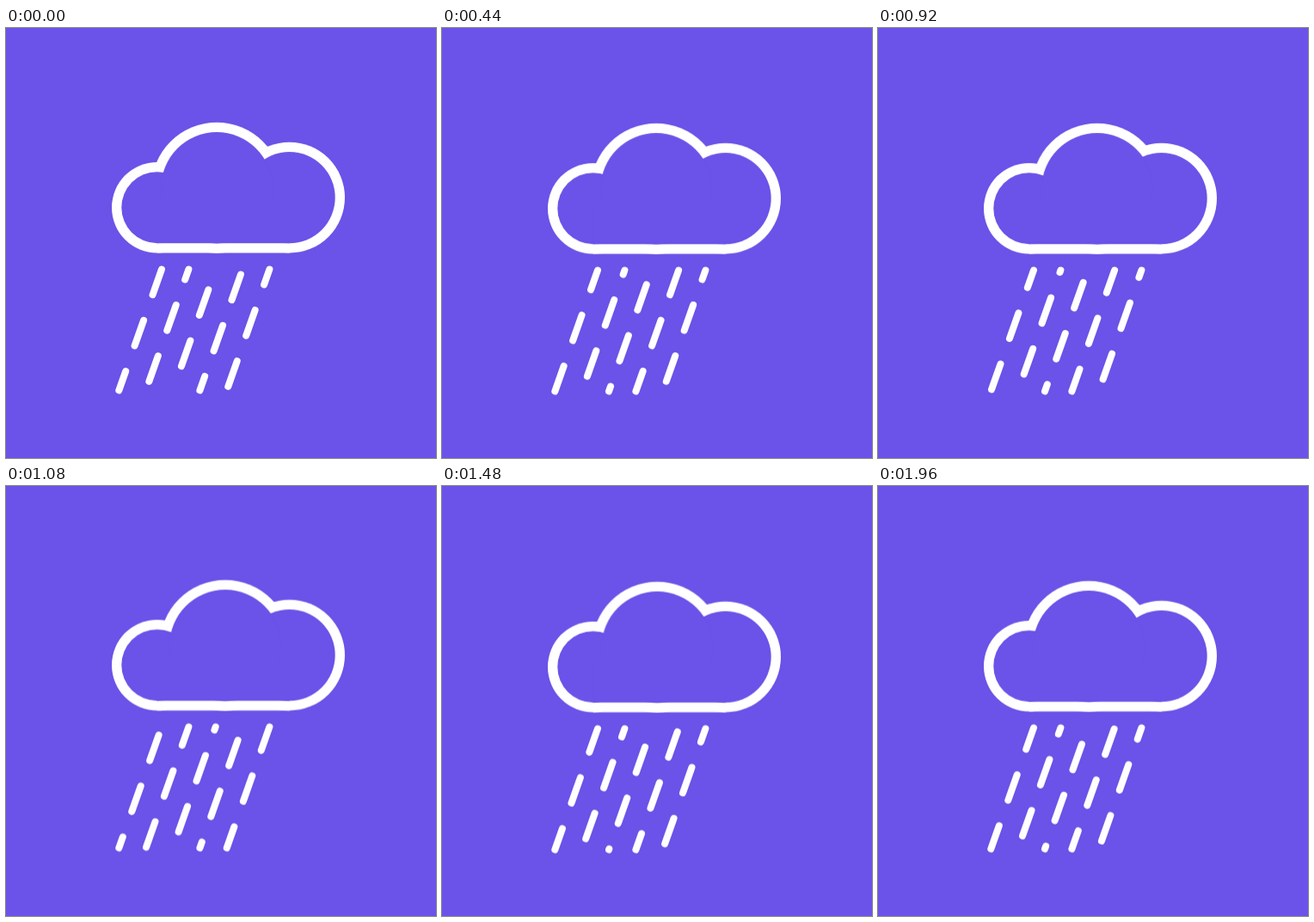
These frames come from a looping animation (500 by 500 pixels, 2 s). An HTML page:

```html
<!DOCTYPE html>
<html lang="en">
<head>
<meta charset="utf-8">
<title>Rain cloud</title>
<style>
  :root { --sky: #6b52e8; --sine: cubic-bezier(.37, 0, .63, 1); }
  html, body { margin: 0; width: 100%; height: 100%; overflow: hidden; background: var(--sky); }
  svg { display: block; width: 100%; height: 100%; }

  .bob { animation: bob .5s var(--sine) -.32s infinite alternate; }
  .puff { animation: drift 1s var(--sine) infinite alternate; }
  .rim { fill: #fff; }
  .core { fill: var(--sky); }

  .rain line {
    stroke: #fff;
    stroke-width: 8;
    stroke-linecap: round;
    stroke-dasharray: 31.4;
    animation: fall .5s linear calc(var(--i) * -.35s) infinite;
  }

  @keyframes bob { from { transform: translateY(1.8px); } to { transform: translateY(-1.8px); } }
  @keyframes drift { from { transform: translateX(-5px); } to { transform: translateX(5px); } }
  @keyframes fall { from { stroke-dashoffset: 0; } to { stroke-dashoffset: -62.8px; } }
</style>
</head>
<body>
<svg viewBox="0 0 500 500">
  <g class="bob">
    <g class="rim">
      <circle cx="175.8" cy="209.7" r="52.8"/>
      <circle cx="329.6" cy="198.1" r="64.4"/>
      <circle class="puff" cx="250" cy="186.8" r="76"/>
      <rect x="175.8" y="205" width="153.8" height="57.5"/>
    </g>
    <g class="core">
      <circle cx="175.8" cy="209.7" r="41.5"/>
      <circle cx="329.6" cy="198.1" r="53.1"/>
      <circle class="puff" cx="250" cy="186.8" r="64.7"/>
      <rect x="175.8" y="205" width="153.8" height="46.2"/>
    </g>
    <g class="rain">
      <line style="--i:0" x1="181" y1="281.5" x2="131.3" y2="422.3"/>
      <line style="--i:1" x1="212.4" y1="281.5" x2="162.7" y2="422.3"/>
      <line style="--i:2" x1="243.7" y1="281.5" x2="194" y2="422.3"/>
      <line style="--i:3" x1="275.1" y1="281.5" x2="225.4" y2="422.3"/>
      <line style="--i:4" x1="306.4" y1="281.5" x2="256.7" y2="422.3"/>
    </g>
  </g>
</svg>
</body>
</html>
```
